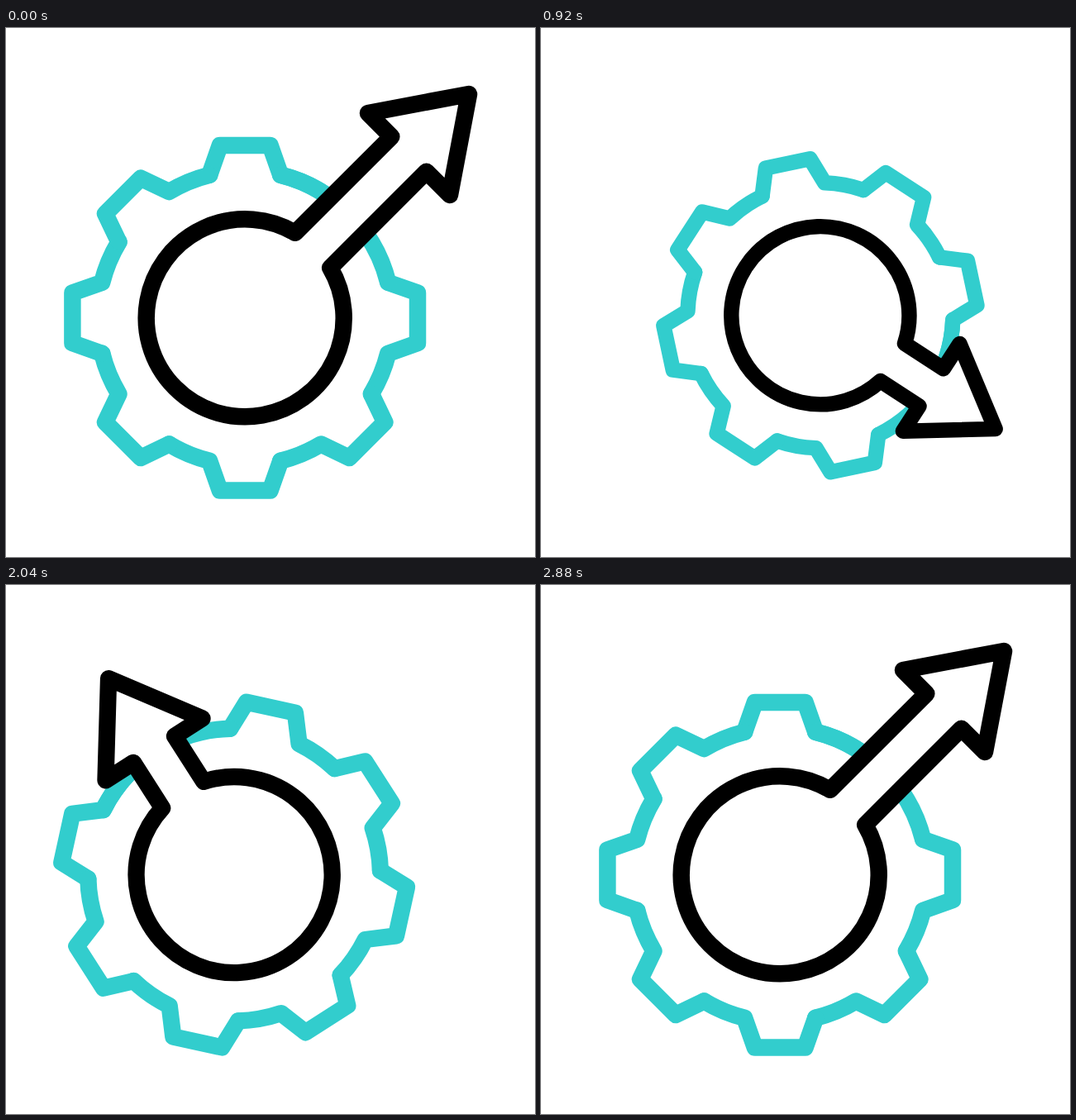
Write an HTML page without scripts that moves like this. It is 640 px wide and 640 px high and loops after 3000 ms.

```html
<!DOCTYPE html>
<html lang="en">
<head>
<meta charset="utf-8">
<title>Gear and arrow</title>
<style>
  html, body { margin: 0; width: 100%; height: 100%; overflow: hidden; background: #fff; }
  svg { display: block; width: 100%; height: 100%; }
  .line { stroke-width: 20.5; stroke-linecap: round; stroke-linejoin: round; }
  .gear { fill: none; stroke: #32cdcd; }
  .arrow { fill: #fff; stroke: #000; }
</style>
</head>
<body>
<svg viewBox="0 0 640 640">
  <defs>
    <!-- One tooth and the rim up to the next one -->
    <path id="tooth" d="M-43-173L-30.4-208.8H30.4L43-173A178.3 178.3 0 0 1 91.9-152.7"/>
  </defs>

  <!-- Sway, then scale about the stage centre, then spin about the hub -->
  <g>
    <animateTransform attributeName="transform" type="translate" dur="3s" repeatCount="indefinite"
      calcMode="spline" values="0 0;0 0;46 0;-18 0;0 0;0 0"
      keyTimes="0;.02667;.29333;.58667;.86667;1"
      keySplines=".333 0 .667 1;.333 0 .667 1;.333 0 .667 1;.333 0 .667 1;.333 0 .667 1"/>
    <g transform="translate(320 320)">
      <g>
        <animateTransform attributeName="transform" type="scale" dur="3s" repeatCount="indefinite"
          calcMode="spline" values="1;1;.9;1;1"
          keyTimes="0;.02667;.29333;.76;1"
          keySplines=".333 0 .667 1;.333 0 .667 1;.333 0 .667 1;.333 0 .667 1"/>
        <g transform="translate(-30.8 30.8)">
          <g>
            <animateTransform attributeName="transform" type="rotate" dur="3s" repeatCount="indefinite"
              calcMode="spline" values="0;0;360;360"
              keyTimes="0;.02667;.96;1"
              keySplines=".333 0 .667 1;.333 0 .667 1;.333 0 .667 1"/>

            <g class="line gear">
              <use href="#tooth"/>
              <use href="#tooth" transform="rotate(90)"/>
              <use href="#tooth" transform="rotate(135)"/>
              <use href="#tooth" transform="rotate(180)"/>
              <use href="#tooth" transform="rotate(225)"/>
              <use href="#tooth" transform="rotate(270)"/>
              <use href="#tooth" transform="rotate(315)"/>
              <path d="M43-173A178.3 178.3 0 0 1 173-43"/>
            </g>

            <path class="line arrow" transform="rotate(-45)"
              d="M115.7 29.9A119.5 119.5 0 1 1 115.7 -29.9L280.4 -29.9L280.4 -70L383 0L280.4 70L280.4 29.9Z">
              <!-- The shaft shortens and grows back -->
              <animate attributeName="d" dur="3s" repeatCount="indefinite" calcMode="spline"
                keyTimes="0;.02667;.38667;.58667;.96;1"
                keySplines=".333 0 .667 1;.333 0 .667 1;.333 0 .667 1;.333 0 .667 1;.333 0 .667 1"
                values="M115.7 29.9A119.5 119.5 0 1 1 115.7 -29.9L280.4 -29.9L280.4 -70L383 0L280.4 70L280.4 29.9Z;
                        M115.7 29.9A119.5 119.5 0 1 1 115.7 -29.9L280.4 -29.9L280.4 -70L383 0L280.4 70L280.4 29.9Z;
                        M115.7 29.9A119.5 119.5 0 1 1 115.7 -29.9L163.1 -29.9L163.1 -70L265.7 0L163.1 70L163.1 29.9Z;
                        M115.7 29.9A119.5 119.5 0 1 1 115.7 -29.9L163.1 -29.9L163.1 -70L265.7 0L163.1 70L163.1 29.9Z;
                        M115.7 29.9A119.5 119.5 0 1 1 115.7 -29.9L280.4 -29.9L280.4 -70L383 0L280.4 70L280.4 29.9Z;
                        M115.7 29.9A119.5 119.5 0 1 1 115.7 -29.9L280.4 -29.9L280.4 -70L383 0L280.4 70L280.4 29.9Z"/>
            </path>
          </g>
        </g>
      </g>
    </g>
  </g>
</svg>
</body>
</html>
```
